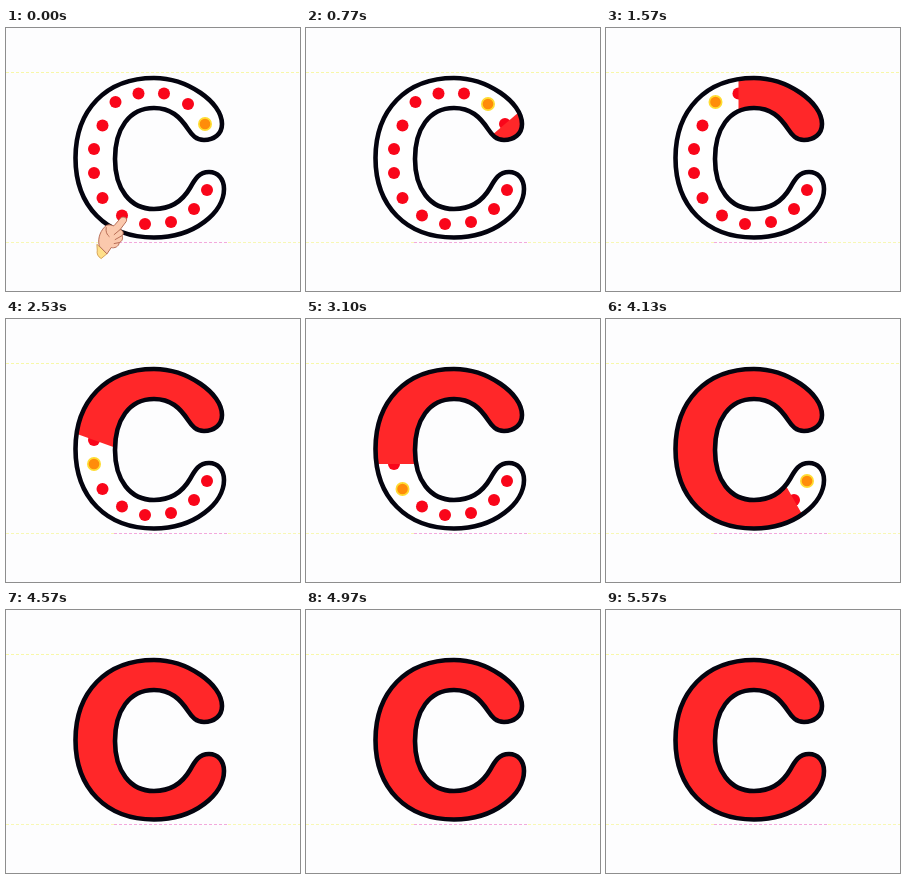
These frames come from a looping animation (294x263 px, 5.61 s). An HTML page with a canvas:

```html
<!DOCTYPE html>
<html lang="en">
<head>
<meta charset="utf-8">
<title>Trace the letter C</title>
<style>
html, body { margin: 0; width: 100%; height: 100%; overflow: hidden; background: #fdfdfe; }
canvas { display: block; width: 294px; height: 263px; }
</style>
</head>
<body>
<canvas id="stage" width="294" height="263"></canvas>
<script>
const ctx = document.getElementById('stage').getContext('2d');
const LOOP = 5610;
const RED = '#ff2729';
const letter = new Path2D(
  'M148 50 C181 50 216 74 216 96 C216 106 208 112 198 112 C190 112 186 107 182 101 ' +
  'C174 89 165 80 148 80 C123 80 109 101 109 131 C109 161 124 181 148 181 ' +
  'C166 181 177 172 184 160 C189 151 193 144 203 144 C212 144 218 151 218 161 ' +
  'C218 184 189 209.5 148 209.5 C100 209.5 69.5 178 69.5 130 C69.5 82 100 50 148 50 Z');
const dots = [
  [199, 96], [182, 76], [158, 65.5], [132.5, 65.5], [109.5, 74], [96.5, 97.5], [88, 121],
  [88, 145], [96.5, 170], [116, 187.5], [139, 196], [165, 194], [188, 181], [201, 162]
];
// moment at which each dot is reached
const hits = [720, 1000, 1260, 1500, 1820, 2120, 2430, 2800, 3150, 3480, 3690, 3880, 4060, 4260];
const HAND_FROM = 9, HAND_MOVE = 520, HAND_END = 570;

function disc(x, y, r, color) {
  ctx.fillStyle = color;
  ctx.beginPath();
  ctx.arc(x, y, r, 0, Math.PI * 2);
  ctx.fill();
}

function dashes(x1, x2, y, color) {
  ctx.save();
  ctx.strokeStyle = color;
  ctx.lineWidth = 1;
  ctx.setLineDash([3, 2]);
  ctx.beginPath();
  ctx.moveTo(x1, y);
  ctx.lineTo(x2, y);
  ctx.stroke();
  ctx.restore();
}

function paintTrail(last) {
  if (last < 0) return;
  ctx.strokeStyle = RED;
  ctx.lineWidth = 50;
  ctx.lineCap = 'butt';
  ctx.lineJoin = 'miter';
  ctx.beginPath();
  ctx.moveTo(216, 116);
  for (let i = 0; i <= last; i++) ctx.lineTo(...dots[i]);
  ctx.stroke();
}

function shape(path, fill, line) {
  const p = new Path2D(path);
  ctx.fillStyle = fill;
  ctx.fill(p);
  ctx.strokeStyle = line;
  ctx.lineWidth = 1;
  ctx.stroke(p);
}

// drawn with the fingertip near the local origin
function drawHand(x, y) {
  ctx.save();
  ctx.translate(x, y);
  ctx.lineJoin = ctx.lineCap = 'round';
  shape('M-25 29 L-15 38 L-21 43 Q-26 40 -25 35 Z', '#ffe08a', '#d9a65a');
  shape('M-23 30 C-25 22 -21 14 -16 10 C-12 8 -9 11 -8 10 L-2 3 C1 0 6 2 4 6 ' +
        'L-2 14 C1 15 2 18 0 20 C1 23 0 26 -3 27 C-3 31 -8 33 -11 32 L-15 38 Z',
        '#fbc9ad', '#b96f58');
  ctx.beginPath();
  ctx.moveTo(-2, 14); ctx.lineTo(-8, 19);
  ctx.moveTo(0, 20); ctx.lineTo(-7, 24);
  ctx.moveTo(-3, 27); ctx.lineTo(-8, 28);
  ctx.moveTo(-16, 12); ctx.quadraticCurveTo(-17, 18, -13, 21);
  ctx.stroke();
  ctx.restore();
}

function draw(t) {
  ctx.fillStyle = '#fdfdfe';
  ctx.fillRect(0, 0, 294, 263);
  dashes(0, 294, 44.5, '#f8f8a8');
  dashes(0, 108, 214.5, '#f8f8b4');
  dashes(108, 222, 214.5, '#f3a8dc');
  dashes(222, 294, 214.5, '#f8f8b4');

  const reached = hits.filter(h => t >= h).length;
  ctx.save();
  ctx.clip(letter);
  ctx.fillStyle = '#fff';
  ctx.fill(letter);
  if (reached === dots.length) {
    ctx.fillStyle = RED;
    ctx.fill(letter);
  } else {
    dots.forEach(([x, y], i) => {
      if (i !== reached) disc(x, y, 6, '#f9061a');
    });
    paintTrail(reached - 1);
    const [x, y] = dots[reached];
    disc(x, y, 7, '#ffdc32');
    disc(x, y, 5.3, '#ff8c0a');
  }
  ctx.restore();

  ctx.strokeStyle = '#04040f';
  ctx.lineWidth = 4.6;
  ctx.lineJoin = 'round';
  ctx.stroke(letter);

  if (t < HAND_END) {
    const end = dots.length - 1;
    const pos = HAND_FROM + Math.min(t / HAND_MOVE, 1) * (end - HAND_FROM);
    const i = Math.min(Math.floor(pos), end - 1), f = pos - i;
    const [a, b] = [dots[i], dots[i + 1]];
    drawHand(a[0] + (b[0] - a[0]) * f, a[1] + (b[1] - a[1]) * f);
  }
}

const start = performance.now();
function tick() {
  draw((performance.now() - start) % LOOP);
  requestAnimationFrame(tick);
}
tick();
</script>
</body>
</html>
```
